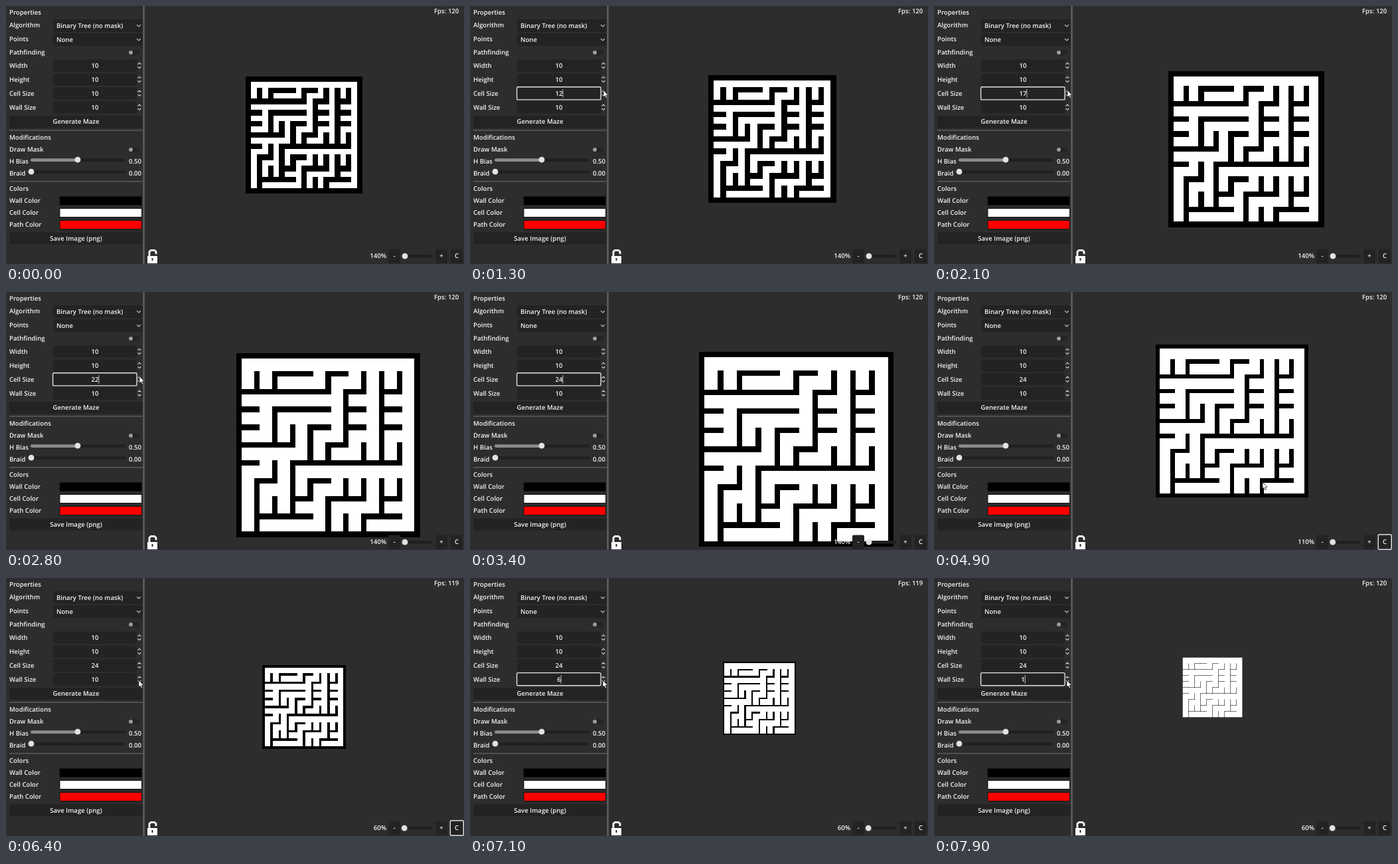
These frames come from a looping animation (690x388 px, 8000 ms). An HTML page with a canvas:

```html
<!DOCTYPE html>
<html lang="en">
<head>
<meta charset="utf-8">
<title>Maze generator</title>
<style>
html, body { margin: 0; width: 100%; height: 100%; overflow: hidden; background: #2d2d2d; }
canvas { display: block; }
</style>
</head>
<body>
<canvas id="stage" width="690" height="388"></canvas>
<script>
const ctx = document.getElementById('stage').getContext('2d');
const LOOP = 8000, TICK = 100;
const UNIT = 690 / 1152;
const CENTER = { x: 449.1, y: 194 };
const BG = '#2d2d2d', FIELD = '#232323', TEXT = '#f4f4f4', FOCUS = '#e2e2e2';

// Rows 1-9, columns 0-8 of a binary tree: H = wall above the cell, V = wall on its right.
const MAZE = [
  'VVHHVHVVV', 'HHHHHVHVH', 'HVHHHVHVH', 'HVVVHVHVH', 'HHHVVHVVV',
  'HVVHHHHHH', 'VHVVHVVVV', 'VVVHVHHVH', 'VHHHVVVHH'
];

// Moments at which a value moves by one step.
const CELL_STEPS = [1100, 1300, 1400, 1600, 1700, 1900, 2100, 2200, 2300, 2500, 2700, 2800, 3000, 3100];
const WALL_STEPS = [6500, 6700, 6900, 7000, 7200, 7300, 7500, 7700, 7800];
const ZOOM_STEPS = [4600, 4700, 4900, 5000, 5100, 5200, 5300, 5400];
const CENTERED_AT = 4000;

// Visible stretches of the pointer as [time, x, y].
const POINTER_PATHS = [
  [[200, 201, 127], [3200, 201, 127], [3300, 376, 208]],
  [[3700, 655, 372], [3800, 676, 374], [4000, 676, 374], [4100, 661, 371], [4400, 495, 286],
   [5400, 495, 286], [5700, 200, 154], [8000, 200, 154]]
];

const countPast = (steps, t) => steps.filter(s => s <= t).length;

function pointerAt(t) {
  const path = POINTER_PATHS.find(p => t >= p[0][0] && t <= p[p.length - 1][0]);
  if (!path) return null;
  const i = Math.max(1, path.findIndex(p => p[0] >= t));
  const [t0, x0, y0] = path[i - 1], [t1, x1, y1] = path[i];
  const k = (t - t0) / (t1 - t0);
  return { x: x0 + (x1 - x0) * k, y: y0 + (y1 - y0) * k };
}

function box(x, y, w, h, fill, radius = 0) {
  ctx.fillStyle = fill;
  ctx.beginPath();
  ctx.roundRect(x, y, w, h, radius);
  ctx.fill();
}

function outline(x, y, w, h) {
  ctx.strokeStyle = FOCUS;
  ctx.lineWidth = 1.4;
  ctx.beginPath();
  ctx.roundRect(x, y, w, h, 2);
  ctx.stroke();
}

function dot(x, y, r, fill) {
  ctx.fillStyle = fill;
  ctx.beginPath();
  ctx.arc(x, y, r, 0, Math.PI * 2);
  ctx.fill();
}

function line(points, color, width) {
  ctx.strokeStyle = color;
  ctx.lineWidth = width;
  ctx.beginPath();
  points.forEach(([x, y]) => ctx.lineTo(x, y));
  ctx.stroke();
}

function label(text, x, y, align = 'left') {
  ctx.fillStyle = TEXT;
  ctx.textAlign = align;
  ctx.fillText(text, x, y + 3.4);
}

const chevron = (x, y, dy, size, color = '#c8c8c8') =>
  line([[x - size, y - dy], [x, y + dy], [x + size, y - dy]], color, 1.2);

function dropdown(name, value, y) {
  label(name, 5, y - 0.5);
  box(71, y - 9.5, 135, 19, FIELD, 2);
  label(value, 76, y + 0.5);
  chevron(200, y, 1.4, 3);
}

function toggle(name, y) {
  label(name, 5, y);
  box(184, y - 3.5, 17, 7, '#242424', 3.5);
  dot(188, y, 3, '#9c9c9c');
}

function spinBox(name, value, y, focused) {
  label(name, 5, y);
  box(71, y - 9, 126, 18.5, FIELD, 2);
  label(value, 134, y, 'center');
  chevron(201, y - 2.9, -1.1, 2.5);
  chevron(201, y + 2.9, 1.1, 2.5);
  if (focused) {
    outline(70.6, y - 9.6, 126.5, 19.2);
    box(134 + ctx.measureText(value).width / 2, y - 6, 0.8, 12.5, TEXT);
  }
}

function wideButton(name, y) {
  box(5, y - 9, 201, 18, FIELD, 2);
  label(name, 105.5, y, 'center');
}

function slider(name, value, y, from, at) {
  label(name, 5, y);
  box(from, y - 4.7, 180 - from, 4.6, '#202020', 2);
  box(from, y - 4.7, at - from, 4.6, '#8c8c8c', 2);
  dot(at, y - 2.8, 4.4, '#e2e2e2');
  label(value, 204, y, 'right');
}

function colorButton(name, color, y) {
  label(name, 5, y);
  box(80, y - 7.5, 125, 15, '#1b1b1b', 2);
  box(81.5, y - 6, 122.5, 12, color);
}

function smallButton(name, x, pointer, focused) {
  const hover = pointer && pointer.x >= x && pointer.x < x + 18 && pointer.y > 365;
  box(x, 365.5, 18, 21.5, hover ? '#353535' : FIELD, 2);
  label(name, x + 9, 376, 'center');
  if (focused) outline(x - 0.7, 364.7, 20, 22.6);
}

function openLock() {
  box(213, 376, 15, 11, '#fff');
  line([[216, 377], [216, 369.5], [218.3, 367.3], [223.7, 367.3], [226, 369.5], [226, 373]], '#fff', 2.8);
  box(219.5, 379, 2, 4, BG);
}

function panel(cell, wall, focus) {
  label('Properties', 5, 10);
  dropdown('Algorithm', 'Binary Tree (no mask)', 29.5);
  dropdown('Points', 'None', 50.5);
  toggle('Pathfinding', 70);
  spinBox('Width', '10', 89.5);
  spinBox('Height', '10', 110.4);
  spinBox('Cell Size', String(cell), 131.3, focus === 'cell');
  spinBox('Wall Size', String(wall), 152.2, focus === 'wall');
  wideButton('Generate Maze', 174);
  box(5, 186.3, 201, 1.2, '#666');
  label('Modifications', 5, 198);
  toggle('Draw Mask', 216);
  slider('H Bias', '0.50', 234, 37, 108);
  slider('Braid', '0.00', 252, 34, 38);
  box(5, 263.3, 201, 1.2, '#666');
  label('Colors', 5, 275);
  colorButton('Wall Color', '#000', 293);
  colorButton('Cell Color', '#fff', 311);
  colorButton('Path Color', '#f00', 329);
  wideButton('Save Image (png)', 349.5);
  box(206.3, 0, 2.6, 388, '#5e5e5e');
}

function maze(cell, wall, zoom, centered) {
  const scale = UNIT * zoom;
  const pitch = (cell + wall) * scale, thick = wall * scale;
  const size = pitch * 10 + thick;
  // Resizing drifts the corner until the view is centred again.
  const fullSize = (centered ? 350 : 210) * scale;
  const drift = centered ? 1.3 * (10 - wall) : 1.17 * (cell - 10);
  const left = CENTER.x - fullSize / 2 - drift, top = CENTER.y - fullSize / 2 - drift;
  const pen = Math.max(thick, 0.55);

  // Walls sit on whole pixels unless they are thinner than one.
  const snap = thick >= 1 ? Math.round : v => v;
  const block = (x, y, w, h) => {
    const x0 = snap(left + x), y0 = snap(top + y);
    ctx.fillRect(x0, y0, snap(left + x + w) - x0, snap(top + y + h) - y0);
  };

  ctx.fillStyle = '#fff';
  block(0, 0, size, size);
  ctx.fillStyle = '#000';
  for (const edge of [0, pitch * 10]) {
    block(0, edge, size, thick);
    block(edge, 0, thick, size);
  }
  MAZE.forEach((row, r) => [...row].forEach((kind, c) => {
    const x = c * pitch, y = (r + 1) * pitch;
    if (kind === 'H') block(x, y, pitch + pen, pen);
    else block(x + pitch, y, pen, pitch + pen);
  }));
}

function zoomBar(zoom, pointer, focused) {
  label(Math.round(zoom * 100) + '%', 573, 376, 'right');
  smallButton('-', 576, pointer);
  box(597, 374, 46, 4.4, '#202020', 2);
  dot(600 + zoom - 0.4, 376.2, 4.4, '#e2e2e2');
  smallButton('+', 647, pointer);
  smallButton('C', 670, pointer, focused);
}

function arrow({ x, y }) {
  const shape = [[0, 0], [0, 10], [2.3, 8], [4, 11.8], [5.7, 11], [4.1, 7.4], [7.2, 7.1]];
  ctx.beginPath();
  shape.forEach(([dx, dy]) => ctx.lineTo(x + dx, y + dy));
  ctx.closePath();
  ctx.fillStyle = '#fff';
  ctx.fill();
  ctx.strokeStyle = '#111';
  ctx.lineWidth = 0.7;
  ctx.stroke();
}

function draw(t) {
  const cell = 10 + countPast(CELL_STEPS, t);
  const wall = 10 - countPast(WALL_STEPS, t);
  const zoom = (14 - countPast(ZOOM_STEPS, t)) / 10;
  const focus = t < CELL_STEPS[0] ? '' : t < CENTERED_AT ? 'cell' : t < WALL_STEPS[0] ? 'center' : 'wall';
  const pointer = pointerAt(t);

  ctx.font = '600 9.6px "Open Sans", "Noto Sans", sans-serif';
  ctx.textRendering = 'geometricPrecision';
  box(0, 0, 690, 388, BG);
  maze(cell, wall, zoom, t >= CENTERED_AT);
  panel(cell, wall, focus);
  openLock();
  label('Fps: ' + (t >= 5600 && t < 7600 ? 119 : 120), 645, 8);
  zoomBar(zoom, pointer, focus === 'center');
  if (pointer) arrow(pointer);
}

const start = performance.now();
function frame() {
  const t = (performance.now() - start) % LOOP;
  draw(Math.floor(t / TICK) * TICK);
  requestAnimationFrame(frame);
}
frame();
</script>
</body>
</html>
```
